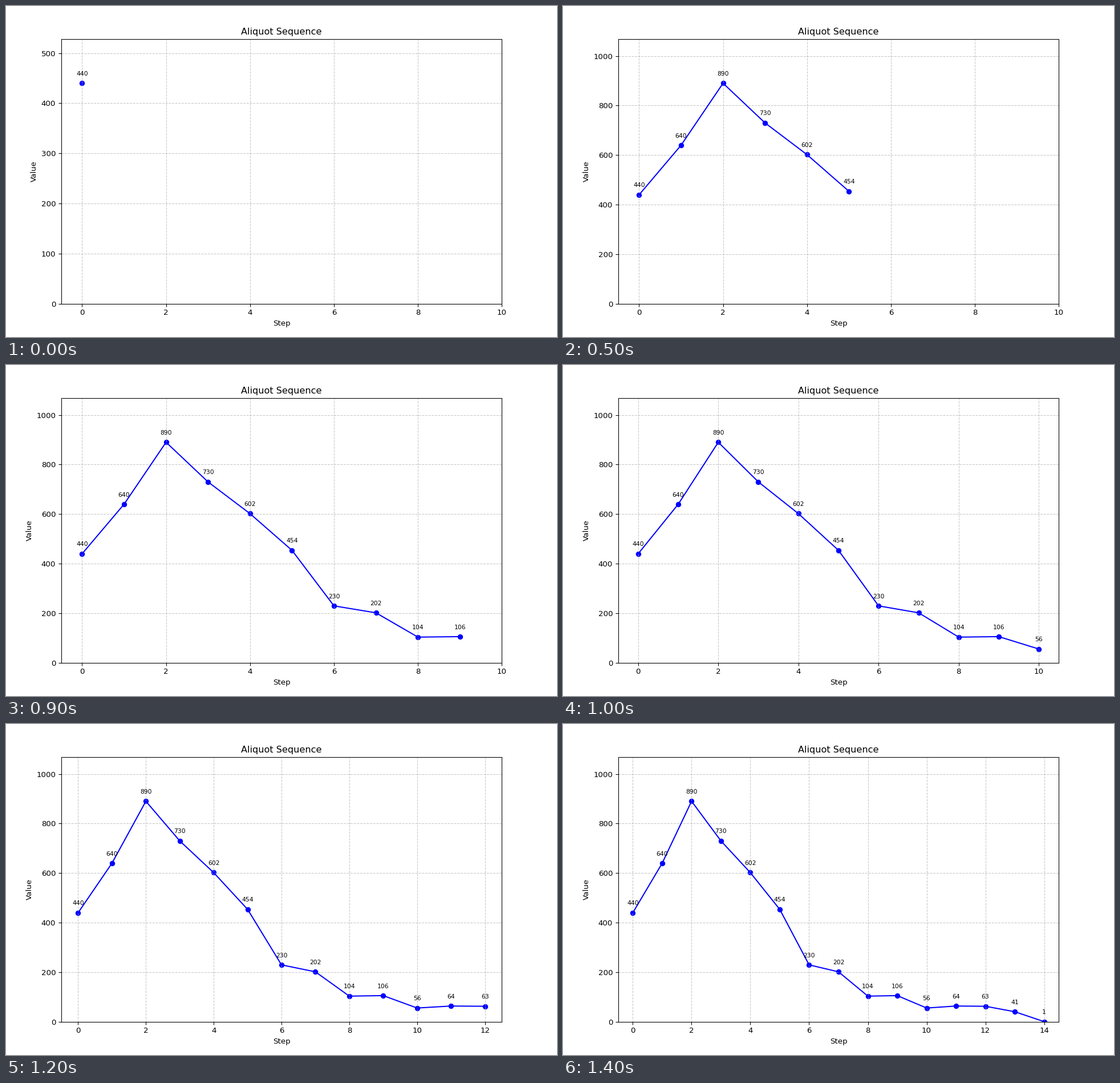
A matplotlib script that plays this animation: 966 px wide and 580 px high, repeating every 1500 ms.

```python
import matplotlib.pyplot as plt
from matplotlib.animation import FuncAnimation

WIDTH, HEIGHT, DPI = 966, 580, 96.6
START = 440


def aliquot(n):
    """Sum of the proper divisors of n."""
    return sum(d for d in range(1, n // 2 + 1) if n % d == 0)


sequence = [START]
while sequence[-1] > 1:
    sequence.append(aliquot(sequence[-1]))

fig = plt.figure(figsize=(WIDTH / DPI, HEIGHT / DPI), dpi=DPI)
ax = fig.add_axes([0.1, 0.1, 0.8, 0.8])


def draw(step):
    values = sequence[:step + 1]
    steps = range(len(values))

    ax.clear()
    ax.set_title("Aliquot Sequence")
    ax.set_xlabel("Step")
    ax.set_ylabel("Value")
    ax.grid(True, linestyle="--", alpha=0.7)

    # Scatter dots sit below the grid, the line above it.
    ax.scatter(steps, values, color="blue")
    ax.plot(steps, values, color="blue")
    for x, y in zip(steps, values):
        ax.annotate(str(y), (x, y), xytext=(0, 10),
                    textcoords="offset points", ha="center", fontsize=8)

    ax.set_xlim(-0.5, max(10, step + 0.5))
    ax.set_ylim(0, max(values) * 1.2)
    return []


anim = FuncAnimation(fig, draw, frames=len(sequence), init_func=lambda: [],
                     interval=100, repeat=True, repeat_delay=0)
plt.show()
```
